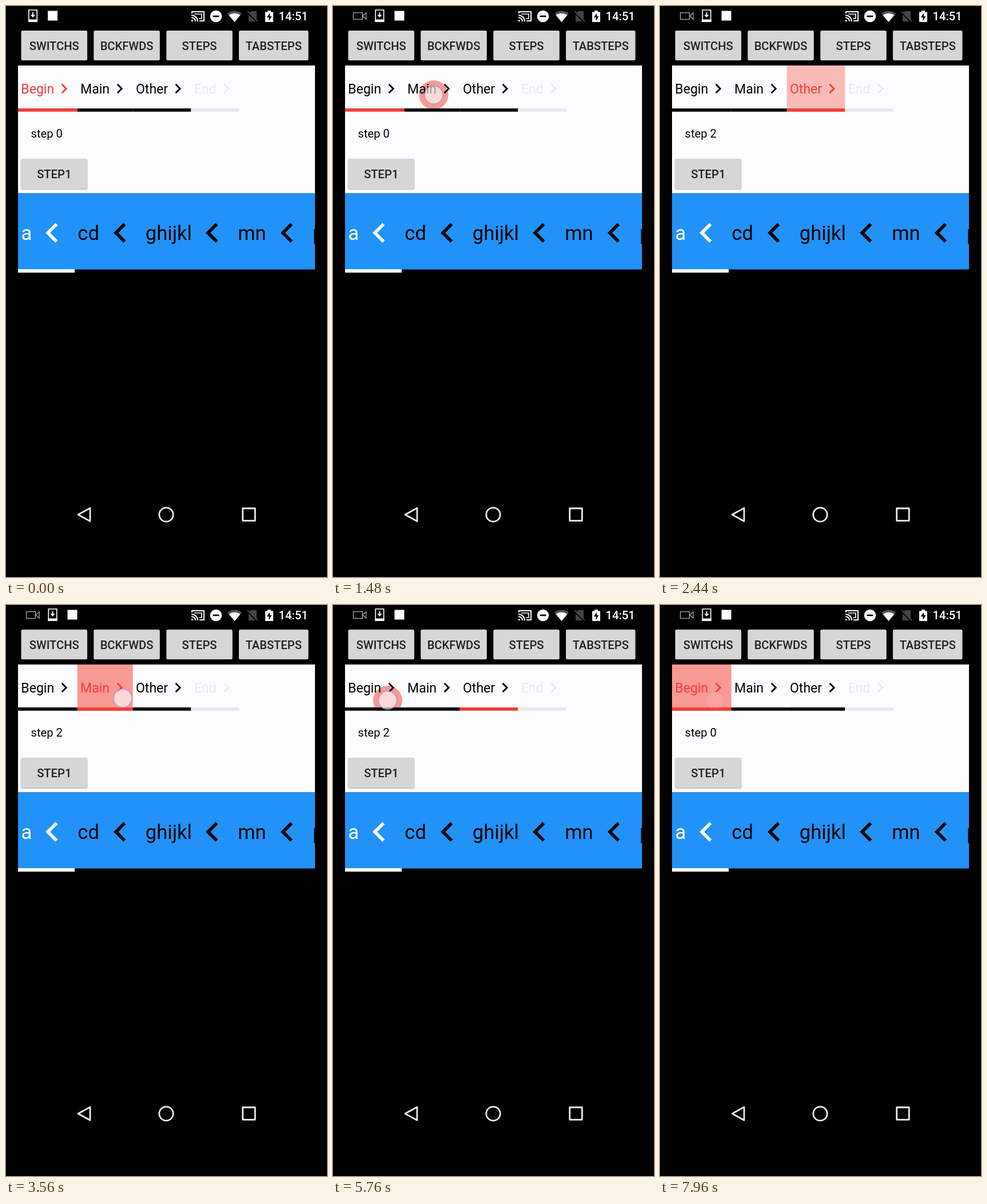
These frames come from a looping animation (561 px wide and 998 px high, 8000 ms). An HTML page:

```html
<!DOCTYPE html>
<html lang="en">
<head>
<meta charset="utf-8">
<title>Step tabs</title>
<style>
  html, body { margin: 0; width: 100%; height: 100%; overflow: hidden; background: #000; }
  svg { display: block; width: 100vw; height: 100vh; font-family: Roboto, Arial, sans-serif; }
  .label { font-size: 20.18px; font-weight: 500; fill: #1f1f1f; text-anchor: middle; }
  .button { fill: #d6d6d6; filter: drop-shadow(0 1px 1px rgba(0, 0, 0, .35)); }
  .tab { font-size: 23.07px; }
  .big { font-size: 34.6px; }
  .nav { fill: none; stroke: #eee; stroke-width: 2.8; }
</style>
</head>
<body>
<svg viewBox="0 0 561 998" preserveAspectRatio="none">
  <defs>
    <clipPath id="tabClip"><rect id="clipBox" y="104" height="81"/></clipPath>
    <clipPath id="panelClip"><rect x="21" y="104" width="519" height="362"/></clipPath>
    <path id="next" d="M10 6 8.59 7.41 13.17 12 8.59 16.59 10 18 16 12z"/>
    <path id="prev" d="M15.41 7.41 14 6 8 12 14 18 15.41 16.59 10.83 12z"/>
  </defs>
  <rect width="561" height="998"/>

  <!-- status bar -->
  <g id="camera" fill="none" stroke="#aaa" stroke-width="1.3">
    <path d="M35.6 11.6H51.4V23.4H35.6zM52 17.5 58 12V23z"/>
  </g>
  <g id="notices">
    <path d="M39.8 7H54.2V27H39.8z" fill="none" stroke="#fff" stroke-width="1.7"/>
    <path d="M39 23.5H55V28H39z" fill="#fff"/>
    <path d="M46 11H48V15.5H51.3L47 20 42.7 15.5H46z" fill="#fff"/>
    <rect x="73" y="8.5" width="17" height="17" fill="#fff"/>
  </g>
  <g fill="none" stroke="#fff" stroke-width="2">
    <path d="M325 13V10H346V26H338"/>
    <path d="M324 16.2A10.5 10.5 0 0 1 335 27M324 20.2A6.5 6.5 0 0 1 331 27"/>
    <path d="M329 14H342V22H337" stroke-width="1.6"/>
  </g>
  <path d="M324 24A3 3 0 0 1 327 27H324z" fill="#fff"/>
  <circle cx="367" cy="18" r="10.3" fill="#fff"/>
  <path d="M361.5 16.7H372.5V19.3H361.5z"/>
  <path d="M387 13Q399.500 4 412 13L399.500 28z" fill="#555"/>
  <path d="M389.500 16Q399.500 9.500 409.500 16L399.500 28z" fill="#fff"/>
  <path d="M429 9H438V26L424 12.500zM424 15 436 27H424z" fill="#444"/>
  <path d="M422 9 440 27" stroke="#444" stroke-width="2"/>
  <path d="M453 10.500H457V8H463V10.500H467V28H453z" fill="#fff"/>
  <path d="M461 12.500 455.800 20H459.500V26L464.500 18H461z"/>
  <text x="476.500" y="25" font-size="20.18" font-weight="500" fill="#fff">14:51</text>

  <g id="buttons"></g>

  <!-- step panel -->
  <rect x="21" y="104" width="519" height="223.500" fill="#fdfcff"/>
  <circle id="ripple" clip-path="url(#tabClip)" fill="#f44336" fill-opacity=".53"/>
  <g id="tabs"></g>
  <text id="step" x="43.500" y="229.800" font-size="20.18"></text>
  <g id="stepButton"></g>

  <!-- blue strip -->
  <g clip-path="url(#panelClip)">
    <rect x="21" y="327.500" width="519" height="133" fill="#2192f8"/>
    <rect x="21" y="460" width="99" height="6" fill="#fff"/>
    <g id="strip"></g>
  </g>

  <path class="nav" d="M126 889 147 877.500V900.500z" stroke-linejoin="round"/>
  <circle class="nav" cx="280" cy="889" r="12.200"/>
  <rect class="nav" x="413.700" y="878" width="21.600" height="21.600" stroke-linejoin="round"/>

  <circle id="pointer" r="16" fill="#fff" fill-opacity=".62" stroke="#8f88d8" stroke-opacity=".5" stroke-width="2"/>
</svg>
<script>
const LOOP = 8000, RED = '#f13e36';
const $ = id => document.getElementById(id);
const clamp = v => Math.min(1, Math.max(0, v));
const ramp = (t, from, to) => clamp((t - from) / (to - from));

function add(parent, name, attrs, text) {
  const el = document.createElementNS('http://www.w3.org/2000/svg', name);
  set(el, attrs);
  if (text) el.textContent = text;
  return parent.appendChild(el);
}
function set(el, attrs) {
  for (const key in attrs) el.setAttribute(key, attrs[key]);
}

function addButton(parent, label, x, y, width, height) {
  add(parent, 'rect', { class: 'button', x, y, width, height, rx: 2.5 });
  add(parent, 'text', { class: 'label', x: x + width / 2, y: y + height / 2 + 7.7 }, label);
}
addButton($('buttons'), 'SWITCHS', 26.5, 43, 115.5, 52);
addButton($('buttons'), 'BCKFWDS', 153.3, 43, 115.5, 52);
addButton($('buttons'), 'STEPS', 280.3, 43, 115.5, 52);
addButton($('buttons'), 'TABSTEPS', 407, 43, 121.5, 52);
addButton($('stepButton'), 'STEP1', 26.5, 267, 115.5, 52.5);

// label, left edge, right edge, arrow left
const tabs = [
  ['Begin', 21, 124.7, 96.7], ['Main', 124.7, 221.7, 193.7],
  ['Other', 221.7, 323.4, 295.5], ['End', 323.4, 407.6, 380.3]
].map(([label, x, end, arrow]) => {
  const width = end - x;
  const face = add($('tabs'), 'g', {});
  add(face, 'text', { class: 'tab', x: x + 5.3, y: 152.6 }, label);
  add(face, 'use', { href: '#next', transform: `translate(${arrow - 12.4} 127.2) scale(1.44)` });
  const bar = add($('tabs'), 'rect', { x, y: 179, width, height: 5.7 });
  return { x, width, face, bar };
});

[['a', 26.5, 69], ['cd', 125.3, 188], ['ghijkl', 243.8, 349], ['mn', 405.3, 479.7], ['p', 536, 580]]
  .forEach(([label, x, arrow], i) => {
    const fill = i ? '#000' : '#fff';
    add($('strip'), 'text', { class: 'big', x, y: 409.3, fill }, label);
    add($('strip'), 'use', { href: '#prev', fill, transform: `translate(${arrow - 23} 362) scale(2.88)` });
  });

// A tap selects its tab; a press dragged off the tab is cancelled.
const tap = (tab, start, x, y) =>
  ({ tab, start, x, y, fade: start + 320, select: start + 200, lift: start + 200, gone: start + 340 });
const drag = (tab, start, x, y, move, dx, dy, lift, gone) =>
  ({ tab, start, x, y, move, dx, dy, lift, gone, fade: move + 240 });
const presses = [
  tap(1, 1480, 176, 155.5),
  tap(2, 2080, 275, 157),
  drag(1, 2800, 204, 163, 3560, 24, 86, 4180, 4360),
  drag(0, 5760, 95.5, 166.5, 6160, 34, 77.5, 6940, 7120),
  tap(0, 7640, 96, 167)
];

function render(t) {
  let selected = 0;
  for (const p of presses) if (p.select <= t) selected = p.tab;
  let lit = selected, marked = selected;

  const p = presses.find(q => t >= q.start && t < Math.max(q.gone, q.fade + 120));
  let rippleAlpha = 0, pointerAlpha = 0;
  if (p) {
    const age = t - p.start;
    if (t < p.fade) {
      lit = age < 80 ? -1 : p.tab;
      if (age >= 80) marked = p.tab;
    }
    rippleAlpha = 1 - ramp(t, p.fade, p.fade + 120);
    pointerAlpha = 1 - ramp(t, p.lift, p.gone);
    const { x, width } = tabs[p.tab];
    set($('clipBox'), { x, width });
    set($('ripple'), { cx: p.x, cy: p.y, r: 25.5 + 95 * clamp(age / 240) ** 1.4 });
    let cx = p.x, cy = p.y;
    if (p.move) {
      const k = ramp(t, p.move, p.move + 520), eased = k * k * (3 - 2 * k);
      cx += p.dx * eased;
      cy += p.dy * eased;
    }
    set($('pointer'), { cx, cy });
  }
  set($('ripple'), { opacity: rippleAlpha });
  set($('pointer'), { opacity: pointerAlpha });

  tabs.forEach(({ face, bar }, i) => {
    const off = i === 3;
    set(face, { fill: i === lit ? RED : off ? '#ebebed' : '#000' });
    set(bar, { fill: i === marked ? RED : off ? '#e8e8ea' : '#000' });
  });
  $('step').textContent = 'step ' + selected;

  const recording = t >= 80;
  set($('camera'), { opacity: recording ? 1 : 0 });
  set($('notices'), { transform: `translate(${recording ? 34.5 : 0} 0)` });
}

let begin;
function frame(now) {
  begin ??= now;
  render((now - begin) % LOOP);
  requestAnimationFrame(frame);
}
render(0);
requestAnimationFrame(frame);
</script>
</body>
</html>
```
